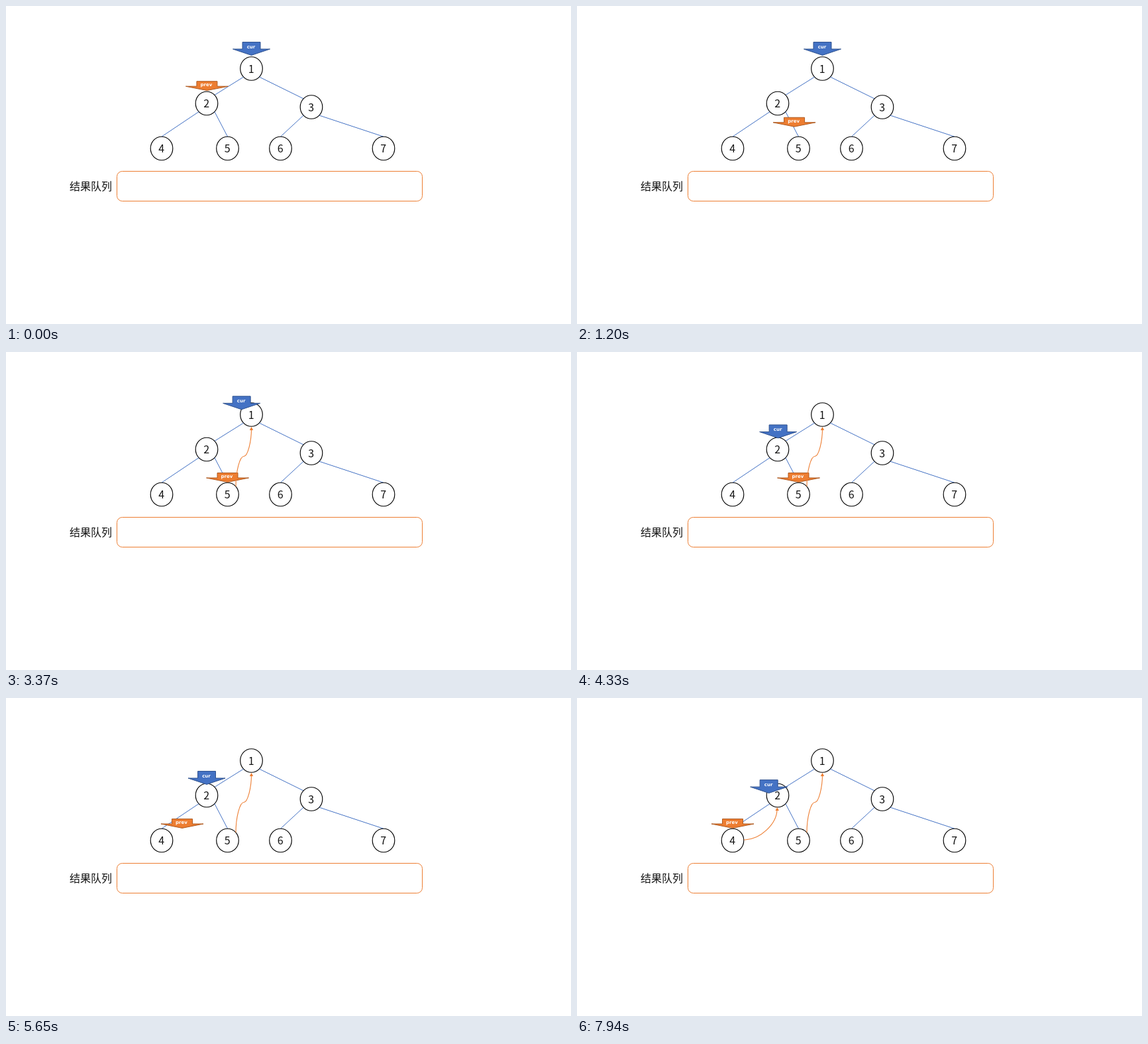
An HTML page for the animation above (8000 ms loop, 853x480 px).

```html
<!DOCTYPE html>
<html lang="zh">
<head>
<meta charset="utf-8">
<style>
  html, body { margin: 0; width: 100%; height: 100%; overflow: hidden; background: #fff; }
  svg { display: block; width: 853px; height: 480px; }
  text { font: 300 16px "Noto Sans CJK SC", "Noto Sans CJK", sans-serif; fill: #111; }
  .digit { text-anchor: middle; }
  .tag { font: bold 7px "DejaVu Sans", sans-serif; fill: #fff; text-anchor: middle; }
  .edge { stroke: #4472c4; }
  .node { fill: #fff; stroke: #000; stroke-width: 1.15; }
  .link path { fill: none; stroke: #ed7d31; stroke-width: 1.1; }
  .link polygon { fill: #ed7d31; }
  .pointer path { stroke-miterlimit: 20; }
</style>
</head>
<body>
<svg viewBox="0 0 853 480">
  <g id="tree"></g>
  <text x="96" y="278">结果队列</text>
  <rect x="167.5" y="249.5" width="461" height="45" rx="8" fill="none" stroke="#ed7d31"/>

  <!-- Pointers have their tip at the local origin -->
  <g id="prev" class="pointer">
    <path d="M-15.5-14.5h31v7.5h16.5L0-.6L-32-7h16.5z" fill="#ed7d31" stroke="#ae5a21"/>
    <text class="tag" x="-1" y="-7">prev</text>
  </g>
  <g id="cur" class="pointer">
    <path d="M-13.5-20.5h27v10.5h14.5L0-.6L-28-10h14.5z" fill="#4472c4" stroke="#2f528f"/>
    <text class="tag" x="-.5" y="-11">cur</text>
  </g>

  <g id="linkToRoot" class="link">
    <path d="M347 203C347 180 353 157.5 359 157.5S370.5 135 370.5 116"/>
    <polygon points="370.5,113 373.2,118 367.8,118"/>
  </g>
  <g id="linkToLeft" class="link">
    <path d="M252 214C277 214 302 189.5 302 168"/>
    <polygon points="302.2,165 304.9,170 299.5,170"/>
  </g>
</svg>
<script>
const LOOP = 8000, START = -160, RISE = 48;
const PREV_TIME = 2000, RISE_TIME = 1000, CUR_TIME = 1600;
const ROUND = PREV_TIME + RISE_TIME + CUR_TIME;
const RX = 16.8, RY = 17.8;
const byId = id => document.getElementById(id);

// Binary tree in heap order
const nodes = [
  [370.5, 94.5],
  [303, 147], [461, 152.5],
  [235, 215], [334.5, 215], [414.5, 215], [570, 215]
];

function drawTree() {
  const diagonalX = RX * Math.SQRT1_2, diagonalY = RY * Math.SQRT1_2;
  byId('tree').innerHTML = nodes.map(([x, y], i) => {
    const shape = `<ellipse class="node" cx="${x}" cy="${y}" rx="${RX}" ry="${RY}"/>
      <text class="digit" x="${x - .4}" y="${y + 6.2}">${i + 1}</text>`;
    if (!i) return shape;
    const [parentX, parentY] = nodes[(i - 1) >> 1];
    const side = Math.sign(x - parentX);
    const isLeaf = 2 * i + 1 >= nodes.length;
    const endX = isLeaf ? x : x - side * diagonalX;
    const endY = y - (isLeaf ? RY : diagonalY);
    return `<line class="edge" x1="${parentX + side * diagonalX}" y1="${parentY + diagonalY}"
      x2="${endX}" y2="${endY}"/>` + shape;
  }).join('');
}

// Every round: prev moves, a link rises, cur moves
const stops = {
  prev: [[303, 127.3], [334.5, 197], [235, 197]],
  cur: [[370.5, 75], [303, 131], [235, 198]]
};
const links = ['linkToRoot', 'linkToLeft'];

const progress = (t, start, duration) => Math.min(1, Math.max(0, (t - start) / duration));
const ease = p => p < .5 ? 2 * p * p : 1 - 2 * (1 - p) ** 2;
const place = (id, x, y) => byId(id).setAttribute('transform', `translate(${x} ${y})`);

function drawPointer(id, t, delay, duration) {
  let [x, y] = stops[id][0];
  stops[id].slice(1).forEach(([toX, toY], round) => {
    const p = ease(progress(t, delay + round * ROUND, duration));
    x += (toX - x) * p;
    y += (toY - y) * p;
  });
  place(id, x, y);
}

function draw(t) {
  drawPointer('prev', t, 0, PREV_TIME);
  drawPointer('cur', t, PREV_TIME + RISE_TIME, CUR_TIME);
  links.forEach((id, round) => {
    const p = progress(t, PREV_TIME + round * ROUND, RISE_TIME);
    byId(id).setAttribute('opacity', p);
    place(id, 0, RISE * (1 - p));
  });
}

function tick() {
  draw(performance.now() % LOOP - START);
  requestAnimationFrame(tick);
}
drawTree();
tick();
</script>
</body>
</html>
```
